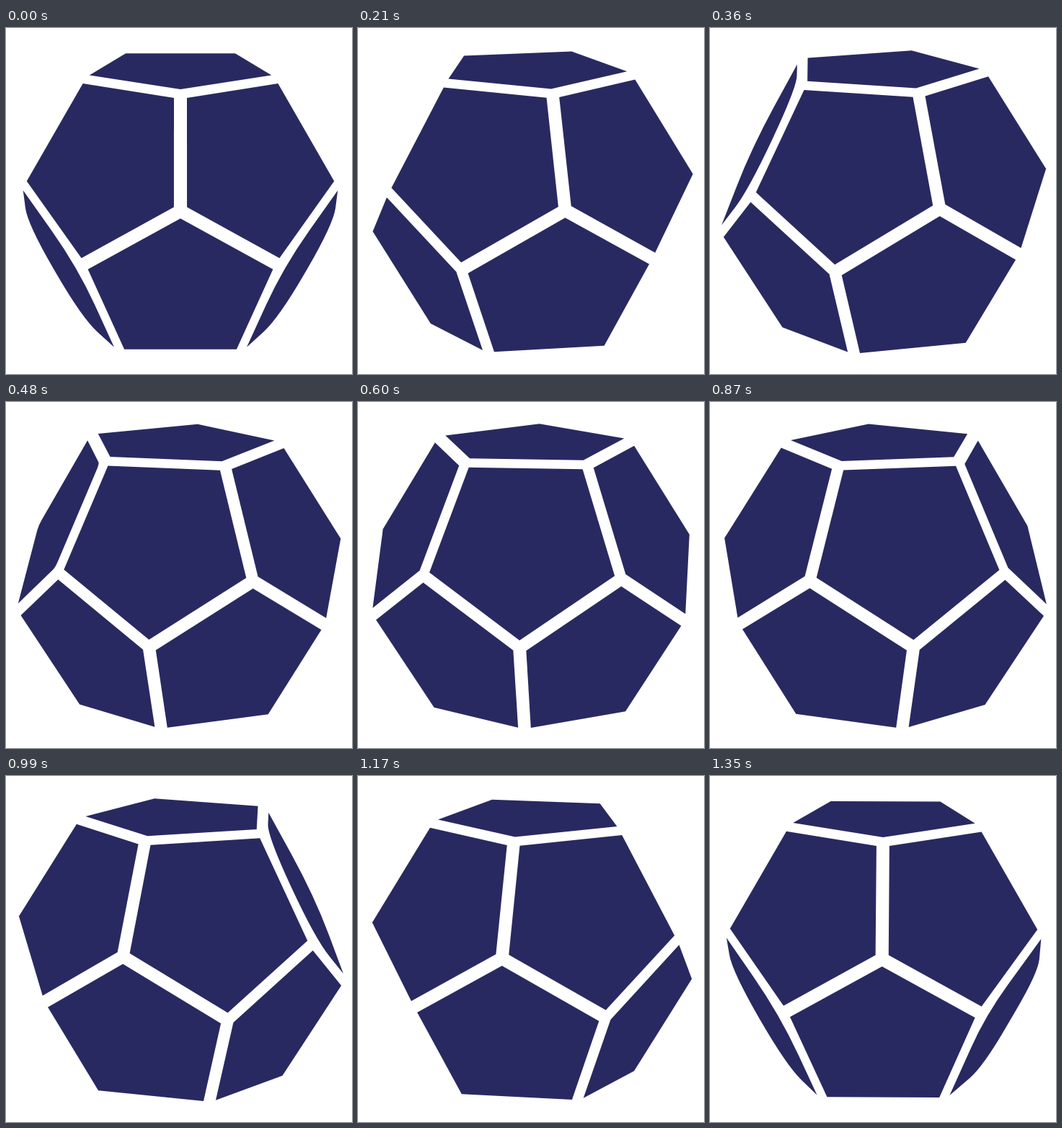
An HTML page with a canvas that plays this animation: 480 px wide and 480 px high, repeating every 1.38 s.

```html
<!DOCTYPE html>
<html>
<head>
<meta charset="utf-8">
<style>
  html, body { margin: 0; width: 100%; height: 100%; overflow: hidden; background: #fff; }
  canvas { display: block; }
</style>
</head>
<body>
<canvas id="stage" width="480" height="480"></canvas>
<script>
const ctx = document.getElementById('stage').getContext('2d');
const RAD = Math.PI / 180;
const LOOP = 1380, TICK = 30, STEP = 1.582 * RAD;
const TILT = 14 * RAD, SCALE = 236, DEPTH = 0.045, CX = 242, CY = 240.5;
const INSET = 0.912;                 // face size relative to the full pentagon
const INRADIUS = 0.7947, FACE_R = 0.607;
const SLOPE = Math.atan(2);          // angle between neighbouring face normals

// Corners of a shrunken face whose normal leans `polar` from the spin axis.
function makeFace(polar, azimuth, turn) {
  const r = FACE_R * INSET;
  return Array.from({ length: 5 }, (_, i) => {
    const a = (turn + i * 72) * RAD;
    const side = r * Math.sin(a), up = r * Math.cos(a);
    return {
      side,
      out: INRADIUS * Math.sin(polar) - up * Math.cos(polar),
      height: INRADIUS * Math.cos(polar) + up * Math.sin(polar),
      azimuth: azimuth * RAD
    };
  });
}

const faces = [makeFace(0, 0, 180), makeFace(Math.PI, 0, 180)];
for (let i = 0; i < 5; i++) {
  faces.push(makeFace(SLOPE, 36 + i * 72, 180));
  faces.push(makeFace(Math.PI - SLOPE, i * 72, 0));
}

function project({ side, out, height, azimuth }, spin) {
  const sin = Math.sin(azimuth + spin), cos = Math.cos(azimuth + spin);
  const x = out * sin + side * cos;
  const d = out * cos - side * sin;
  const y = height * Math.cos(TILT) - d * Math.sin(TILT);
  const z = d * Math.cos(TILT) + height * Math.sin(TILT);
  const s = SCALE / (1 - DEPTH * z);
  return [CX + x * s, CY - y * s];
}

function signedArea(points) {
  return points.reduce((sum, [x, y], i) => {
    const [nx, ny] = points[(i + 1) % points.length];
    return sum + x * ny - nx * y;
  }, 0) / 2;
}

const mix = (a, b, t) => [a[0] + (b[0] - a[0]) * t, a[1] + (b[1] - a[1]) * t];
const heading = (a, b) => Math.atan2(b[1] - a[1], b[0] - a[0]);

// Faces seen almost edge-on get their blunt corners smoothed.
function fillFace(points) {
  const area = signedArea(points);
  if (area <= 0) return;
  const soft = Math.max(0, Math.min(0.5, (8000 - area) / 6000));
  ctx.beginPath();
  points.forEach((p, i) => {
    const prev = points[(i + 4) % 5], next = points[(i + 1) % 5];
    const blunt = Math.cos(heading(p, next) - heading(prev, p)) > 0.5;
    const t = blunt ? soft : 0;
    ctx.lineTo(...mix(p, prev, t));
    ctx.quadraticCurveTo(...p, ...mix(p, next, t));
  });
  ctx.fill();
}

function draw(now) {
  const spin = Math.floor((now % LOOP) / TICK) * STEP;
  ctx.fillStyle = '#fff';
  ctx.fillRect(0, 0, 480, 480);
  ctx.fillStyle = '#292961';
  for (const face of faces) fillFace(face.map(corner => project(corner, spin)));
}

const start = performance.now();
function frame() {
  draw(performance.now() - start);
  requestAnimationFrame(frame);
}
frame();
</script>
</body>
</html>
```
